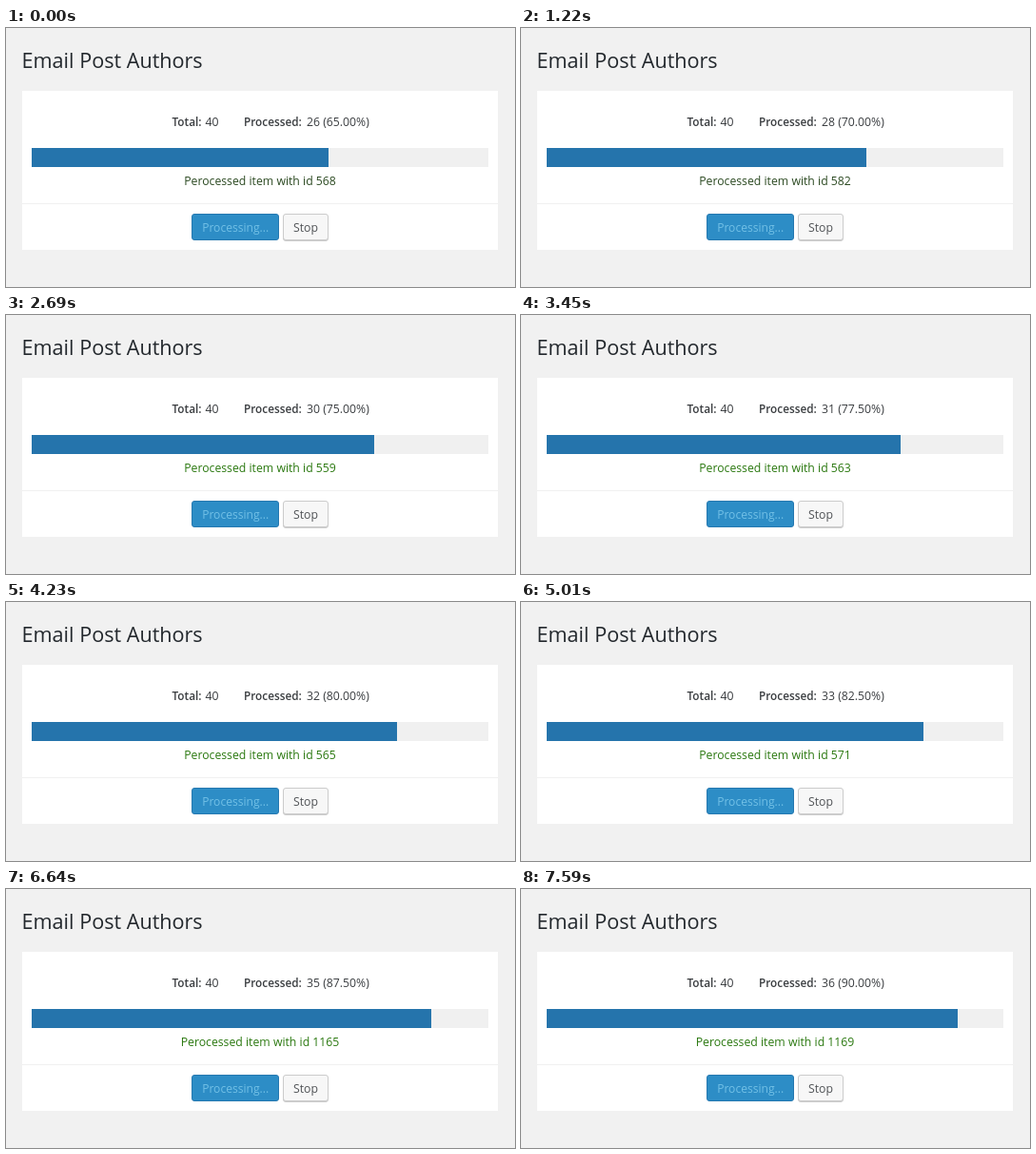
Animation, 535 px wide and 272 px high, one loop 8000 ms. Source, as an HTML page:

```html
<!DOCTYPE html>
<html lang="en">
<head>
<meta charset="utf-8">
<title>Email Post Authors</title>
<style>
  html, body { margin: 0; width: 100%; height: 100%; overflow: hidden; background: #f1f1f1; }
  svg { display: block; width: 535px; height: 272px; }
  text { font: 400 12.25px "Open Sans", "Noto Sans", sans-serif; fill: #3a3d40; }
  rect { shape-rendering: crispEdges; }
  .button { shape-rendering: auto; }
  .title { font-size: 21.6px; fill: #23282d; }
  .label { font-size: 11.8px; font-weight: 600; }
  .middle { text-anchor: middle; }
</style>
</head>
<body>
<svg viewBox="0 0 535 272">
  <rect width="535" height="272" fill="#f1f1f1"/>
  <text class="title" x="16.5" y="42">Email Post Authors</text>

  <rect x="17" y="66" width="500" height="167" fill="#fff"/>
  <text class="label" x="174.5" y="103">Total:</text>
  <text x="209.5" y="103">40</text>
  <text class="label" x="250" y="103">Processed:</text>
  <text id="count" x="316" y="103"></text>

  <rect x="27" y="126" width="480" height="20" fill="#f0f0f0"/>
  <rect id="bar" x="27" y="126" width="0" height="20" fill="#2574ac"/>
  <text id="message" class="middle" x="267" y="165"></text>

  <rect x="17" y="184" width="500" height="1" fill="#f0f0f0"/>
  <rect class="button" x="195.5" y="195.5" width="91" height="27" rx="2.5" fill="#2d8dc6" stroke="#2578b0"/>
  <text class="middle" x="241.2" y="214" style="font-size:12.1px;fill:#72c0e6">Processing...</text>
  <rect class="button" x="291.5" y="196.5" width="47" height="27" rx="2.5" fill="#ccc" stroke="#ccc"/>
  <rect class="button" x="291.5" y="195.5" width="47" height="27" rx="2.5" fill="#f7f7f7" stroke="#ccc"/>
  <text class="middle" x="315" y="214" style="fill:#505356">Stop</text>
</svg>
<script>
  const LOOP = 8000, TOTAL = 40, FIRST = 26, BAR_WIDTH = 480;
  const GREEN_FROM = 1980;

  // [start in ms, item id]; each step processes one more item
  const steps = [
    [0, 568], [440, 575], [1220, 582], [1980, 1161], [2690, 559], [3450, 563],
    [4230, 565], [5010, 571], [5710, 562], [6640, 1165], [7590, 1169]
  ];

  const [count, bar, message] = ["count", "bar", "message"].map(id => document.getElementById(id));
  let shown = -1;

  function show(index) {
    const [start, id] = steps[index];
    const done = FIRST + index;
    count.textContent = `${done} (${(done / TOTAL * 100).toFixed(2)}%)`;
    bar.setAttribute("width", BAR_WIDTH * done / TOTAL);
    message.textContent = `Perocessed item with id ${id}`;
    message.style.fill = start < GREEN_FROM ? "#2c4a22" : "#2a780f";
    shown = index;
  }

  const origin = performance.now();

  function tick() {
    const time = (performance.now() - origin) % LOOP;
    const index = steps.filter(([start]) => start <= time).length - 1;
    if (index !== shown) show(index);
    requestAnimationFrame(tick);
  }
  tick();
</script>
</body>
</html>
```
